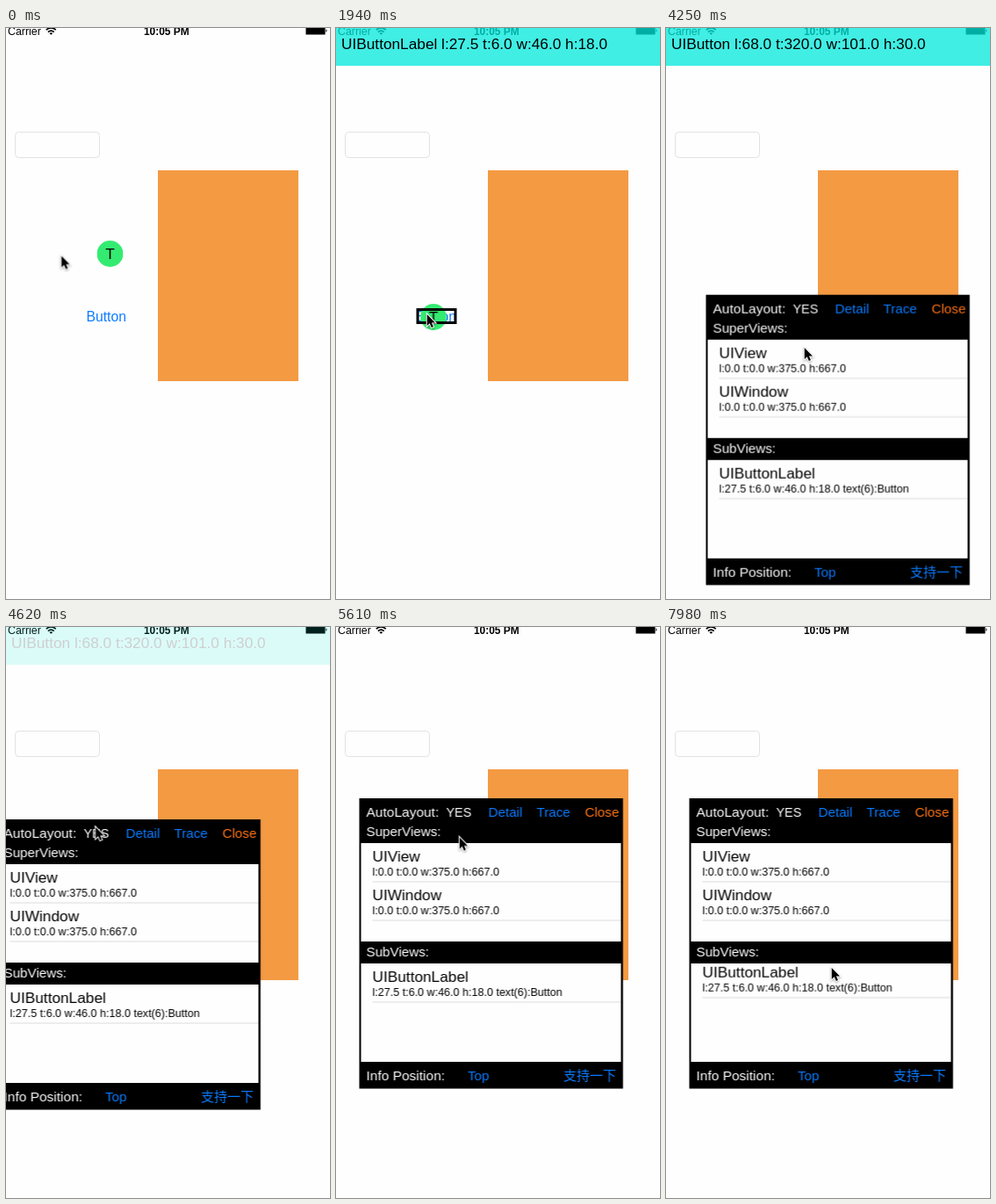
An HTML page that plays this animation: 369 by 650 pixels, repeating every 8000 ms.

```html
<!DOCTYPE html>
<html lang="en">
<head>
<meta charset="utf-8">
<title>View inspector</title>
<style>
  html, body { margin: 0; width: 100%; height: 100%; overflow: hidden; background: #fefefe; }
  svg { display: block; }
  #stage { width: 100%; height: 100%; }
  text { font-family: "Liberation Sans", Arial, sans-serif; font-size: 15.2px; white-space: pre; }
  .blue { fill: #0b7cff; }
  .close { fill: #ff7415; }
  .head text:not([class]) { fill: #fff; }
  .title { font-size: 17.25px; }
  .info { font-size: 12.55px; }
  .status { font-size: 12.4px; }
  .outline { fill: none; stroke: #000; stroke-width: 3; opacity: 0; }
  #banner, #panel, .label { opacity: 0; }
  #arrow { filter: drop-shadow(0 1px 1px rgba(0, 0, 0, .35)); }
</style>
</head>
<body>
<svg id="stage" viewBox="0 0 369 650">
  <rect width="369" height="650" fill="#fefefe"/>
  <rect x="10.5" y="118.5" width="96" height="29" rx="4" fill="#fefefe" stroke="#e2e2e2"/>
  <rect x="173" y="162" width="160" height="240" fill="#f49a43"/>
  <text x="91.5" y="333.5" class="blue" style="font-size:15.7px">Button</text>

  <g class="status">
    <text class="status" x="2" y="8">Carrier</text>
    <g fill="none" stroke="#000" stroke-width="1.7">
      <path d="M45.8 2.2Q51.3 -2.6 56.8 2.2M47.9 4.6Q51.3 1.6 54.7 4.6"/>
      <path d="M51.3 7.8L49.4 6Q51.3 4.6 53.2 6Z" fill="#000" stroke="none"/>
    </g>
    <text x="157" y="8" style="font-size:11.9px;font-weight:bold">10:05 PM</text>
    <path d="M341.5 -2H363.5V7.5H341.5ZM364.4 1.3Q366.6 3 364.4 5Z"/>
  </g>

  <g id="ball">
    <circle r="15" fill="#34eb71"/>
    <text y="6" text-anchor="middle" class="title">T</text>
  </g>

  <rect class="outline" id="rootBox" x="-2.5" y="-5.5" width="372" height="664"/>
  <rect class="outline" id="labelBox" x="93" y="320.5" width="43" height="15"/>
  <rect class="outline" id="buttonBox" x="65.5" y="314.5" width="98" height="27"/>

  <g id="banner">
    <rect width="369" height="43" fill="#00e8db" fill-opacity=".75"/>
    <text class="title label" id="rootText" x="6" y="24">UIView l:0.0 t:0.0 w:375.0 h:667.0</text>
    <text class="title label" id="labelText" x="6" y="24">UIButtonLabel l:27.5 t:6.0 w:46.0 h:18.0</text>
    <text class="title label" id="buttonText" x="6" y="24">UIButton l:68.0 t:320.0 w:101.0 h:30.0</text>
  </g>

  <g id="panel">
    <rect width="300.5" height="330.5"/>
    <g class="head">
      <text x="8" y="20.5" style="font-size:15.5px">AutoLayout:</text>
      <text x="99" y="21" style="font-size:14.4px">YES</text>
      <text x="147" y="20.5" class="blue">Detail</text>
      <text x="202" y="20.5" class="blue">Trace</text>
      <text x="257" y="20.5" class="close">Close</text>
      <text x="8" y="43">SuperViews:</text>
      <text x="8" y="180">SubViews:</text>
      <text x="8" y="320.5" style="font-size:15.5px">Info Position:</text>
      <text x="123.5" y="320.5" class="blue">Top</text>
      <text x="232.5" y="320.5" class="blue" style="font:15px 'Noto Sans CJK SC','Noto Sans CJK',sans-serif">支持一下</text>
    </g>
    <svg x="2" y="51" width="296" height="112"><rect width="296" height="112" fill="#fefefe"/><g id="supers"></g></svg>
    <svg x="2" y="188" width="296" height="112"><rect width="296" height="112" fill="#fefefe"/><g id="subs"></g></svg>
  </g>

  <g id="cursor">
    <path id="arrow" d="M.7 1V14L3.7 11.2L5.8 16L7.9 15L5.9 10.4H10Z" stroke="#fff" stroke-width="2" paint-order="stroke"/>
  </g>
</svg>
<script>
const LOOP = 8000;
const byId = id => document.getElementById(id);

function fillList(id, rows) {
  byId(id).innerHTML = rows.map(([name, info], i) => `
    <g transform="translate(13 ${i * 44})">
      <text class="title" y="20.8">${name}</text>
      <text class="info" y="36.8">${info}</text>
      <path d="M0 44H283" stroke="#dcdcdc"/>
    </g>`).join("");
}
const fullSize = "l:0.0 t:0.0 w:375.0 h:667.0";
fillList("supers", [["UIView", fullSize], ["UIWindow", fullSize]]);
fillList("subs", [["UIButtonLabel", "l:27.5 t:6.0 w:46.0 h:18.0 text(6):Button"]]);

// Each step is [time, ...values, easing?]; the first and last values are held.
function play(id, steps, toStyle, defaultEasing) {
  const all = [[0, ...steps[0].slice(1)], ...steps, [LOOP, ...steps[steps.length - 1].slice(1)]];
  const frames = all.map(([time, ...values]) => {
    const last = values[values.length - 1];
    return {
      offset: time / LOOP,
      easing: typeof last === "string" ? last : defaultEasing,
      ...toStyle(...values)
    };
  });
  byId(id).animate(frames, { duration: LOOP, iterations: Infinity });
}
const move = (id, steps, easing = "ease-in-out") =>
  play(id, steps, (x, y) => ({ transform: `translate(${x}px, ${y}px)` }), easing);
const fade = (id, steps, easing = "ease-in-out") =>
  play(id, steps, opacity => ({ opacity }), easing);
const show = (id, from, to = LOOP) =>
  fade(id, [[0, 0], [from, 1], ...(to < LOOP ? [[to, 0]] : [])], "step-end");
const shift = (steps, dx, dy, dt = 0) =>
  steps.map(([t, x, y, ...rest]) => [t + dt, x + dx, y + dy, ...rest]);

const ballDrag = [
  [1000, 110.5, 253], [1760, 103, 325], [1940, 103, 325], [2290, 79, 322]
];
const panelDrag = [
  [3880, 0, 0, "ease-in"], [4060, 7, 72], [4250, 12, 142], [4330, 10, 158, "ease-in"],
  [4610, -44, 57.5], [4660, -44, 57.5], [4710, -46, 14], [4800, -35, -22], [4960, 8, 2],
  [5100, 6, 31], [5230, -1, 36], [5430, -7, 33.5]
].map(step => step.length < 4 ? [...step, "linear"] : step);

// The pointer runs slightly ahead of the panel it drags.
const lead = 80;
const upperDrag = [[5900, 175, 275], [6100, 178, 335], [6400, 180, 212], [6530, 180, 212]];
const lowerDrag = [[6960, 187, 397], [7330, 188, 472], [7400, 188, 463], [7970, 188, 387]];

move("ball", shift(ballDrag, 8, 4));
move("panel", shift(panelDrag, 33.5, 161.5));
move("cursor", [
  [180, 62.5, 258.5], [600, 110.5, 253],
  ...ballDrag,
  [2710, 79, 322], [3140, 122, 20],
  [3500, 122, 20, "ease-in"], [3610, 165, 145], [3660, 165, 145, "ease-out"], [3780, 147, 205],
  ...shift(panelDrag, 147, 205, -lead),
  [5610, 140, 238.5],
  ...upperDrag,
  [6740, 185, 405], [6810, 185, 405],
  ...lowerDrag
]);

// Rubber-band resistance of a list with nothing to scroll.
const listHeight = 112;
const resist = d => Math.sign(d) * listHeight * (1 - 1 / (Math.abs(d) * .55 / listHeight + 1));
const pull = drag => drag.map(([t, , y]) => [t, 0, resist(y - drag[0][2])]);
move("supers", [...pull(upperDrag), [6750, 0, -5.5, "ease-out"], [6980, 0, 0]]);
move("subs", pull(lowerDrag));

fade("banner", [[620, 0], [920, 1], [4270, 1], [4770, 0]]);
const enterLabel = 1580, enterButton = 2120, release = 2710;
show("rootText", 620, enterLabel);
show("labelText", enterLabel, enterButton);
show("buttonText", enterButton);
show("rootBox", 620, enterLabel);
show("labelBox", enterLabel, enterButton);
show("buttonBox", enterButton, release);
show("panel", 3320);
</script>
</body>
</html>
```
